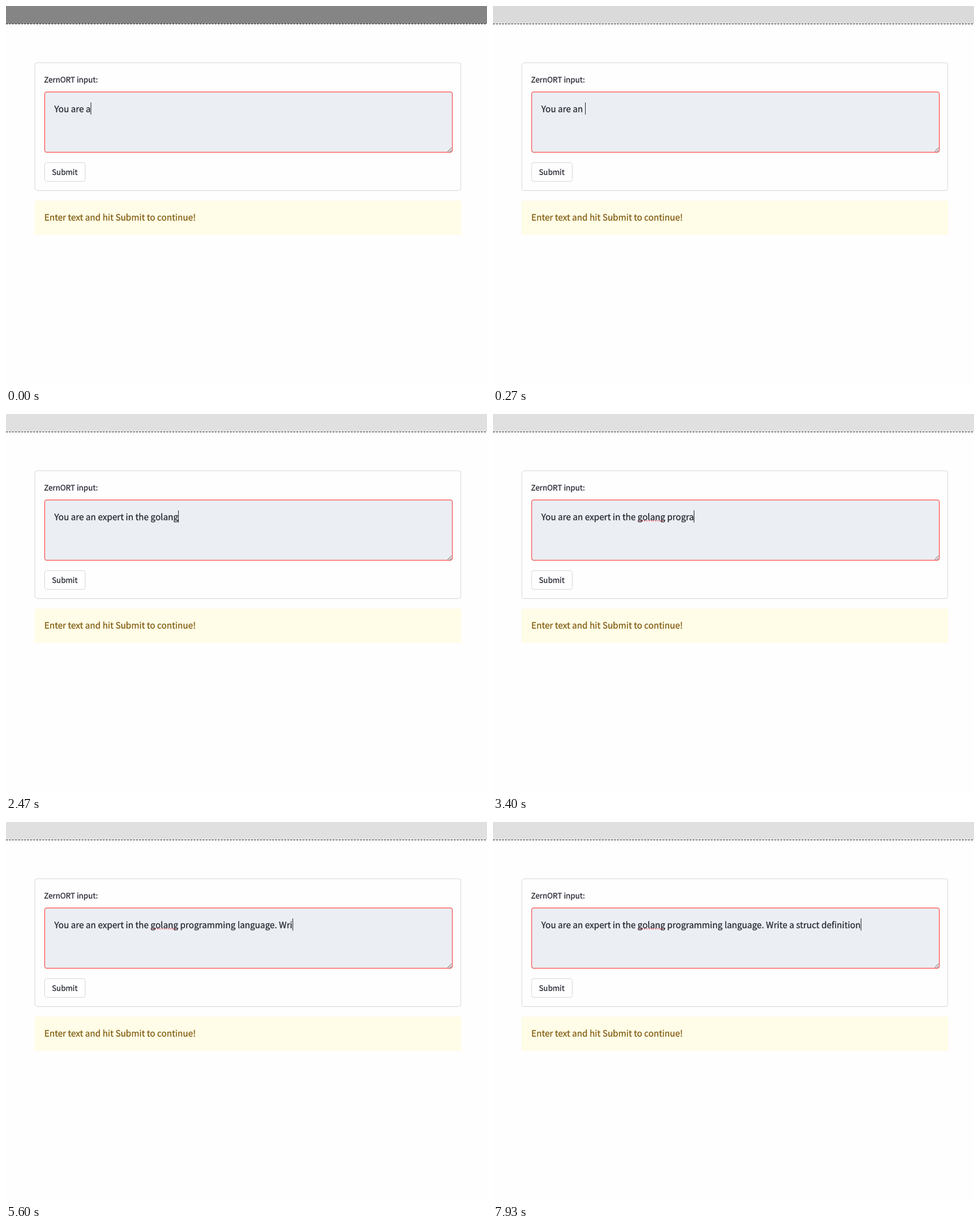
These frames come from a looping animation (841x666 px, 8000 ms). An HTML page:

```html
<!DOCTYPE html>
<html lang="en">
<head>
<meta charset="utf-8">
<title>Prompt form</title>
<style>
  html, body { margin: 0; width: 100%; height: 100%; overflow: hidden; background: #fefefe; }
  svg { display: block; width: 841px; height: 666px; }
  text {
    font-family: "Noto Sans CJK JP", "Noto Sans CJK SC", "Noto Sans CJK", "Open Sans", sans-serif;
    font-size: 15.16px;
    color: #22242e;
    fill: currentColor;
    stroke: currentColor;
    stroke-width: .25px;
    text-rendering: geometricPrecision;
    white-space: pre;
  }
  .small { font-size: 13.26px; }
  .alert { color: #7f590a; }
  .box { fill: #fefefe; stroke: #d5d6d9; }
</style>
</head>
<body>
<svg viewBox="0 0 841 666">
  <rect id="bar" width="841" height="31"/>
  <path d="M0 31.5H841" stroke="#22242e" stroke-dasharray="3.17 2.12"/>

  <rect class="box" x="50.5" y="99.5" width="744.5" height="224" rx="4"/>
  <text class="small" x="66.5" y="133.8">ZernORT input:</text>

  <rect x="67.6" y="150.6" width="712.8" height="105.8" rx="4"
        fill="#ebeef3" stroke="#ff4b4b" stroke-width="1.2"/>
  <path d="M772 255.5l7-7M776 255.5l3-3" stroke="#555"/>
  <path id="squiggle" fill="none" stroke="#f4505a" stroke-width="1.9"
        stroke-linecap="round" stroke-dasharray="0 3.8"/>
  <text id="typed" x="84.4" y="185.7"></text>
  <text id="ruler" x="84.4" y="185.7" visibility="hidden"></text>
  <rect id="caret" y="169" width="1" height="21.3" fill="#22242e"/>

  <rect class="box" x="67.5" y="274.5" width="71" height="33" rx="4"/>
  <text class="small" x="80.2" y="295.8">Submit</text>

  <rect x="50" y="341" width="746" height="60" rx="3" fill="#fffce7"/>
  <text class="alert" x="67" y="376">Enter text and hit Submit to continue!</text>
</svg>
<script>
  const LOOP = 8000, FADE = 330;
  const PROMPT = 'You are an expert in the golang programming language. Write a struct definition';

  // [time, text typed so far ends with]; typing is even between these points
  const PACE = [
    [0, 'You are a'], [130, 'an '], [370, 'an e'], [1200, 'expert in'],
    [1730, 'the g'], [2200, 'golang'], [2400, 'golang'], [3400, 'program'],
    [4200, 'langu'.slice(0, 4)], [4670, 'language'], [5000, '. '], [5170, '. '],
    [6400, 'a st'], [7930, 'definition']
  ].map(([time, end]) => [time, PROMPT.indexOf(end) + end.length]);

  const $ = id => document.getElementById(id);
  const bar = $('bar'), typed = $('typed'), ruler = $('ruler');
  const caret = $('caret'), squiggle = $('squiggle');

  // The extra character lets the ruler give the place after the last letter.
  ruler.textContent = PROMPT + '.';
  const charX = i => ruler.getStartPositionOfChar(i).x;

  const word = PROMPT.indexOf('golang');
  const wordEnd = word + 'golang'.length;
  squiggle.setAttribute('d', `M${charX(word) + 1} 187.3H${charX(wordEnd)}`);

  function typedCount(t) {
    const next = PACE.findIndex(([time]) => time > t);
    if (next < 0) return PROMPT.length;
    const [t0, n0] = PACE[next - 1], [t1, n1] = PACE[next];
    return Math.floor(n0 + (n1 - n0) * (t - t0) / (t1 - t0));
  }

  function draw(t) {
    const count = typedCount(t);
    const left = Math.max(0, 1 - t / FADE);
    const grey = Math.round(224 - 91 * left ** 1.6);
    bar.setAttribute('fill', `rgb(${grey},${grey},${grey})`);
    typed.textContent = PROMPT.slice(0, count);
    caret.setAttribute('x', Math.round(charX(count)));
    squiggle.setAttribute('visibility', count > wordEnd ? 'visible' : 'hidden');
  }

  const begin = performance.now();
  function tick() {
    draw((performance.now() - begin) % LOOP);
    requestAnimationFrame(tick);
  }
  tick();
</script>
</body>
</html>
```
